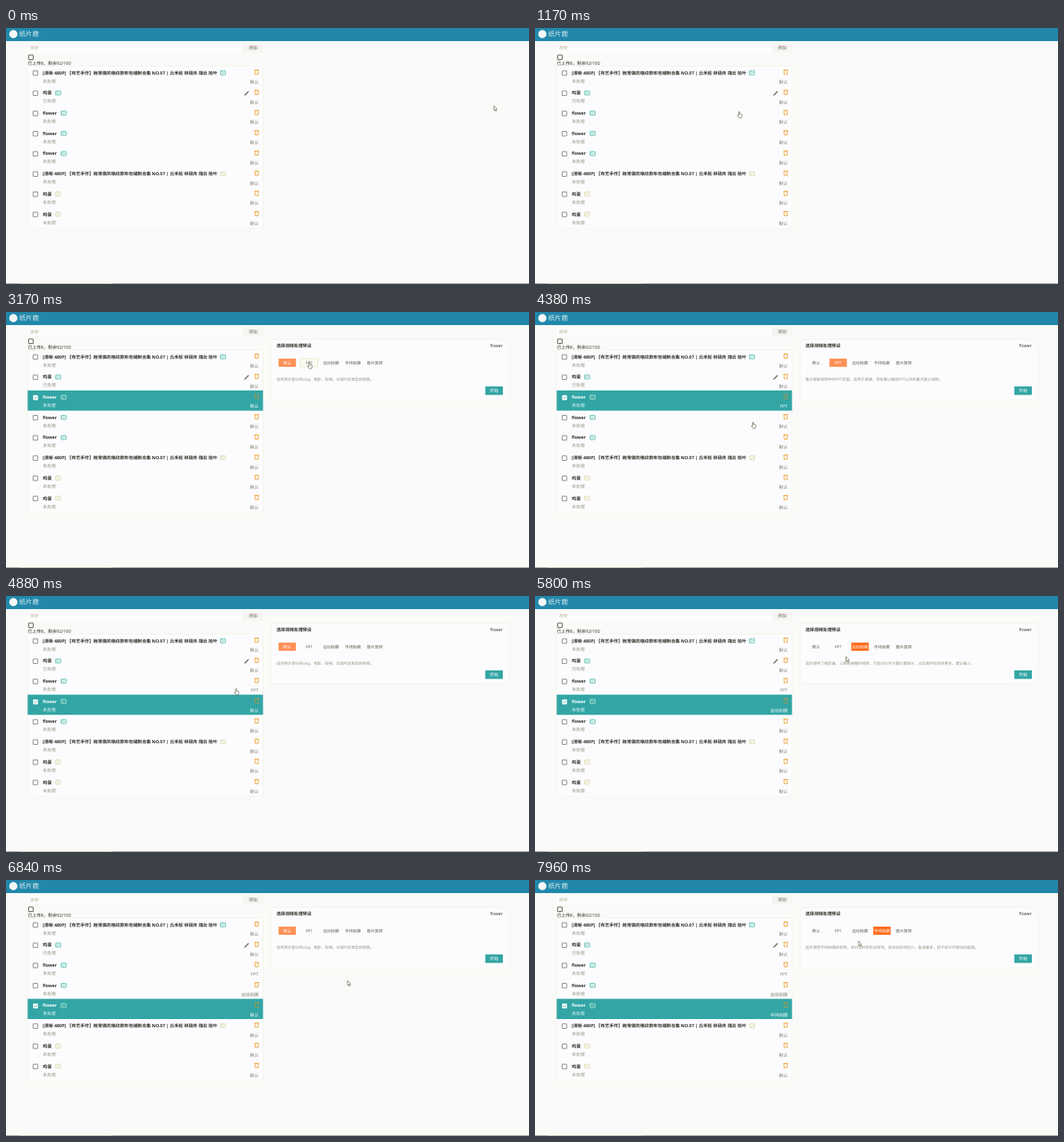
An HTML page for the animation above (8000 ms loop, 640x313 px).

```html
<!DOCTYPE html>
<html lang="zh-CN">
<head>
<meta charset="utf-8">
<title>视频预设</title>
<style>
html, body { margin: 0; width: 100%; height: 100%; overflow: hidden; background: #fafaf8; }
svg { display: block; width: 100%; height: 100%; }
text { font-family: "Open Sans", "Noto Sans CJK SC", "Noto Sans CJK", sans-serif; text-rendering: geometricPrecision; white-space: pre; }
</style>
</head>
<body>
<svg viewBox="0 0 640 313" xmlns="http://www.w3.org/2000/svg">
  <g id="scene"></g>
  <g id="cursor" fill="#fdfdf6" stroke="#5c5c4c" stroke-width=".65" stroke-linejoin="round">
    <path id="arrow" d="M0 0V6L1.4 4.8L2.3 6.8L3.2 6.4L2.3 4.5L4 4.3Z"/>
    <path id="hand" d="M-.6 .5Q0 -.3 .6 .5V3L2.6 3.3Q3.4 3.5 3.3 4.3L2.8 7.7H-.3L-2.3 4.8Q-2.2 3.9 -1.3 4.5L-.6 5Z"/>
  </g>
</svg>
<script>
const LOOP = 8000, HOLD = 240;
const TEAL = '#2188ab', PICK = '#33a5a5', DARK = '#2c2c24', GREY = '#6c6c60', OLIVE = '#92927c';
const GREEN = '#2fb09a', YELLOW = '#d6d096', AMBER = '#f0a030';
const TITLE = '[清晰 480P] 【布艺手作】她常做的格纹款布包缝制合集 NO.07 | 丘禾松 林砚舟 描云 拾叶';

const rows = [TITLE, '鸡蛋', 'flower', 'flower', 'flower', TITLE, '鸡蛋', '鸡蛋'];
const badgeX = { [TITLE]: 262, '鸡蛋': 60.3, flower: 67 };
const presets = [
  ['默认', '适合绝大部分的vlog、电影、短视、动漫片段类型的视频。'],
  ['PPT', '重点提取视频中的PPT页面，适用于网课，但会难以捕捉PPT以外的重点部分视频。'],
  ['运动拍摄', '适合使用了稳定器、三脚架拍摄的视频，可自动分开大量位置镜头，占比高时检测会更多，建议最少。'],
  ['手持拍摄', '适合使用手持拍摄的视频，多抖动时有较长转场，自动会的时间少，备选最多，但不会分开晃动的画面。'],
  ['图片旋转', '']
];

const $ = id => document.getElementById(id);
const rowTop = i => 47 + 24.7 * i;
const optionX = i => 333.5 + 26.8 * i;

// A stop is passed through; a press rests for HOLD and then clicks.
const stop = (at, x, y) => ({ at, x, y, until: at });
const pressRow = (at, row) => ({ at, x: 251, y: rowTop(row) + 5.6, until: at + HOLD, row });
const pressPreset = (at, preset) => ({ at, x: optionX(preset) + 11, y: 61.5, until: at + HOLD, preset });
const moves = [
  stop(0, 597, 95), stop(420, 597, 95), stop(1170, 250, 102),
  pressRow(1400, 2), pressPreset(3170, 1), stop(4380, 267, 134.5),
  pressRow(4500, 3), pressPreset(5220, 2), stop(5800, 380.5, 74),
  pressRow(6120, 4), stop(6840, 418, 123), pressPreset(7400, 3), stop(7960, 396, 74.5)
];

const rect = (x, y, w, h, fill, more = '') =>
  `<rect x="${x}" y="${y}" width="${w}" height="${h}" fill="${fill}" ${more}/>`;
const line = (d, color, width = .8) =>
  `<path d="${d}" fill="none" stroke="${color}" stroke-width="${width}"/>`;
const text = (x, mid, size, str, color, more = '') =>
  `<text x="${x}" y="${mid + size * .36}" font-size="${size}" fill="${color}" ${more}>${str}</text>`;
const bold = 'font-weight="700"', right = 'text-anchor="end"', center = 'text-anchor="middle"';
const card = (x, y, w, h) => rect(x, y, w, h, '#fcfcff', 'stroke="#f3f3ea" stroke-width=".8"');

function checkbox(x, y, on, color = GREY) {
  return on
    ? rect(x, y, 6, 6, '#fff', 'rx=".8"') + line(`M${x + 1.2} ${y + 3}l1.3 1.4 2.5 -2.8`, PICK)
    : rect(x, y, 5.6, 5.6, 'none', `rx=".5" stroke="${color}" stroke-width=".8"`);
}

function badge(x, y, color) {
  return rect(x + .4, y - 2.4, 6.2, 4.9, 'none', `rx=".4" stroke="${color}" stroke-width=".75"`) +
    line(`M${x + 1.5} ${y + .2}l1.2 1 1.2 -1.5 1.5 .2M${x + 1.6} ${y - 1}h1.2`, color, .6);
}

function trash(x, y, color) {
  return line(`M${x - 2.8} ${y - 2.4}h5.6`, color, 1.1) +
    line(`M${x - 1.9} ${y - 1.8}v4.6h3.8v-4.6`, color, .9);
}

function pencil(x, y) {
  return line(`M${x} ${y}l4.4 -4.6`, GREY, 1.5) + line(`M${x - .6} ${y + .6}l1 -1`, DARK, .8);
}

function listRow(name, i, on, preset) {
  const y = rowTop(i), mid = y + 7.7, done = i === 1;
  return (on ? rect(26.5, y - .5, 288, 24.7, PICK) : '') +
    checkbox(33.2, mid - 2.4, on) +
    text(45, mid, 5.4, name, on ? '#fff' : DARK, bold) +
    badge(badgeX[name], mid, on ? '#c4f2dc' : i < 5 ? GREEN : YELLOW) +
    text(45, mid + 10, 5.3, done ? '已处理' : '未处理', on ? '#eefafa' : OLIVE) +
    (done ? pencil(292.4, mid + 2.6) : '') +
    trash(306.8, mid - .8, on ? '#a99a4e' : AMBER) +
    text(309, mid + 11.4, 5.3, presets[preset][0], on ? '#fff' : '#7c7c68', right);
}

function option(name, i, on, hover) {
  const x = optionX(i);
  const box = on ? rect(x, 57, 21.3, 10, i > 1 ? '#ff6d1c' : '#ff9157')
    : hover ? rect(x, 57, 21.3, 10, '#fcfcf4', 'stroke="#e2e2b4" stroke-width=".7"') : '';
  return box + text(x + 10.6, 62, 4.85, name, on ? '#fff' : '#5c5c4a', center);
}

function presetCard(row, now, hover) {
  return card(324.5, 33.5, 291.5, 74) +
    text(331, 41.3, 5.35, '选择视频处理预设', DARK, bold) +
    text(608, 41.3, 5.3, rows[row], DARK, right) +
    presets.map(([name], i) => option(name, i, i === now, i === hover)).join('') +
    text(331, 82.3, 4.6, presets[now][1], OLIVE) +
    rect(586.5, 91, 21.5, 10.4, PICK) + text(597.2, 96.2, 5.3, '开始', '#fff', center);
}

function scene(row, chosen, hover) {
  return rect(0, 0, 640, 16, TEAL) +
    '<circle cx="9" cy="7.5" r="5" fill="#f4f8f8"/>' +
    text(16, 7, 8.1, '纸片鹿', '#d8ecf0') +
    rect(27, 19.5, 263, 10.5, '#fdfdfd') + text(29.5, 24.4, 5.2, '搜索', '#b9b9a2') +
    rect(290, 19.5, 24.5, 10.5, '#f5f5f2') + text(302.5, 24.4, 5.4, '添加', '#66665a', center) +
    checkbox(27.7, 33, false, DARK) +
    text(26.7, 43.4, 5.4, '已上传8，剩余92/100', DARK) +
    card(26.5, 46.3, 288, 198.7) +
    rows.map((name, i) => listRow(name, i, i === row, chosen[i])).join('') +
    rect(0, 312, 640, 1, '#a8a8a4') + rect(17, 312, 113, 1, '#c9c9b4') +
    (row < 0 ? '' : presetCard(row, chosen[row], hover));
}

function pointer(t) {
  const i = moves.findIndex(m => m.at > t);
  const from = moves.at(i < 0 ? -1 : i - 1), to = i < 0 ? from : moves[i];
  const k = to === from ? 0 : Math.max(0, (t - from.until) / (to.at - from.until));
  const e = k * k * (3 - 2 * k);
  return [from.x + (to.x - from.x) * e, from.y + (to.y - from.y) * e];
}

let shown = '';
function draw(t) {
  const [x, y] = pointer(t);
  const chosen = rows.map(() => 0);
  let row = -1;
  for (const m of moves) {
    if (t < m.until) break;
    row = m.row ?? row;
    if (m.preset) chosen[row] = m.preset;
  }

  const overOptions = row >= 0 && y > 57 && y < 67;
  const hover = overOptions ? presets.findIndex((p, i) => x > optionX(i) && x < optionX(i) + 21.3) : -1;
  const overList = x > 27 && x < 314 && y > 47 && y < 245;
  const key = [row, chosen, hover].join();
  if (key !== shown) {
    $('scene').innerHTML = scene(row, chosen, hover);
    shown = key;
  }
  const hand = overList || hover >= 0;
  $('hand').style.display = hand ? '' : 'none';
  $('arrow').style.display = hand ? 'none' : '';
  $('cursor').setAttribute('transform', `translate(${x} ${y})`);
}

const start = performance.now();
function tick() {
  draw((performance.now() - start) % LOOP);
  requestAnimationFrame(tick);
}
tick();
</script>
</body>
</html>
```
